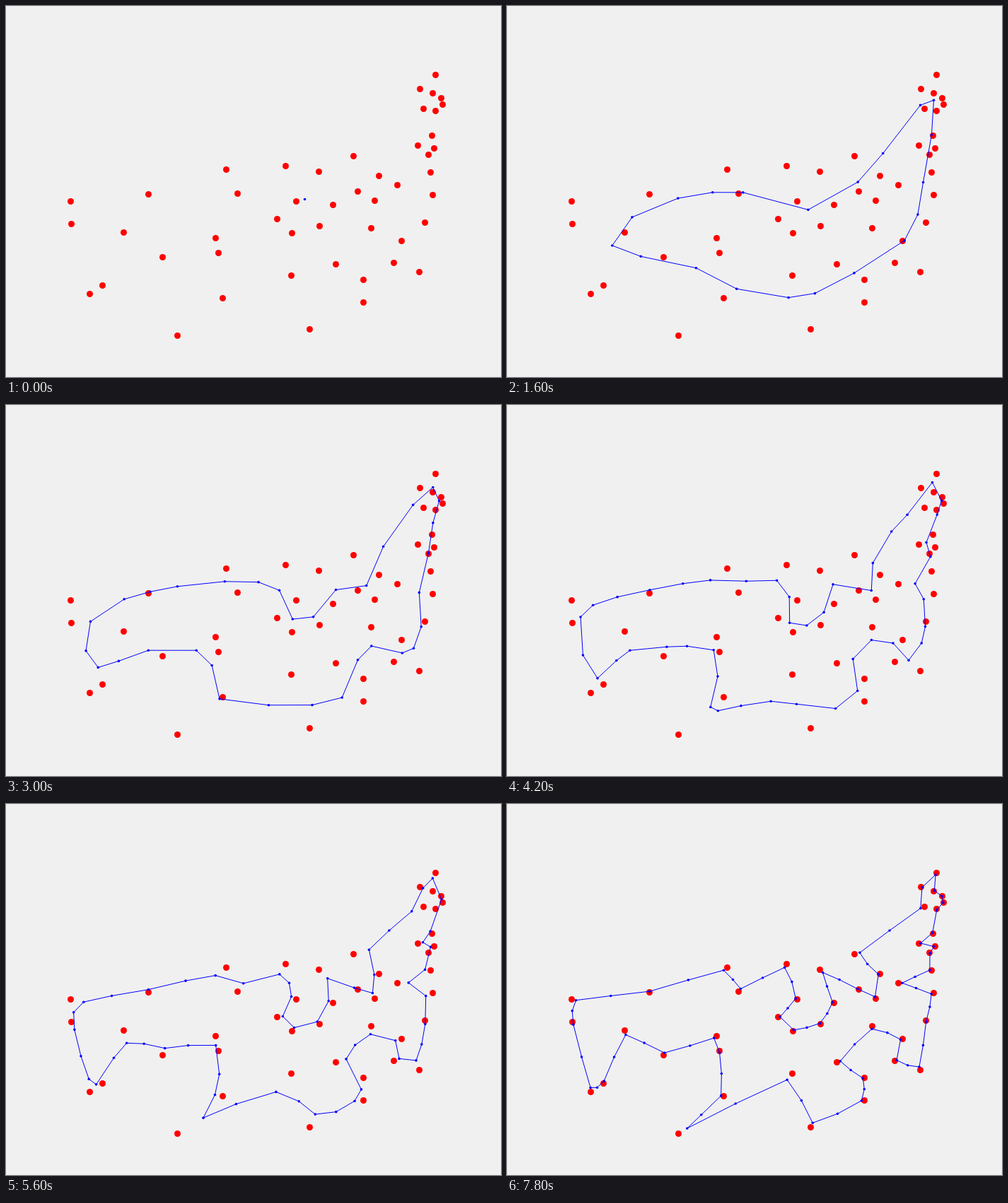
Write an HTML page with a canvas that moves like this. It is 700 by 525 pixels and loops after 8000 ms.

```html
<!DOCTYPE html>
<html lang="en">
<head>
<meta charset="utf-8">
<title>Elastic ring</title>
<style>
html, body { margin: 0; width: 100%; height: 100%; overflow: hidden; background: #f0f0f0; }
canvas { display: block; }
</style>
</head>
<body>
<canvas id="stage" width="700" height="525"></canvas>
<script>
const ctx = document.getElementById('stage').getContext('2d');
const LOOP = 8000, STEP = 200, SEED = [422, 273];

// The cities in the order in which the ring visits them.
const cities = [
  [118, 407], [92, 308], [91, 276], [201, 266], [311, 231], [327, 265], [395, 226], [410, 276],
  [383, 301], [404, 321], [443, 311], [462, 281], [442, 234], [497, 262], [521, 275], [527, 240],
  [491, 212], [590, 145], [585, 117], [607, 97], [603, 123], [615, 130], [617, 139], [607, 148],
  [602, 183], [582, 197], [605, 201], [597, 210], [600, 235], [553, 253], [603, 267], [592, 306],
  [584, 376], [548, 363], [559, 332], [516, 314], [466, 365], [505, 387], [505, 419], [429, 457],
  [403, 381], [242, 466], [306, 413], [300, 349], [296, 328], [221, 355], [166, 320], [136, 395]
];

const dist = (a, b) => Math.hypot(a[0] - b[0], a[1] - b[1]);

// Mean of the cities, weighted by a bell curve around place u of the tour.
function pull(u, sigma) {
  let x = 0, y = 0, sum = 0;
  cities.forEach((c, k) => {
    const gap = Math.abs(u - k);
    const d = Math.min(gap, cities.length - gap);
    const w = Math.exp(-0.5 * (d / sigma) ** 2);
    x += w * c[0];
    y += w * c[1];
    sum += w;
  });
  return [x / sum, y / sum];
}

// Drops the nodes that matter least to the shape until count are left.
function thin(ring, count) {
  while (ring.length > count) {
    const n = ring.length;
    const worth = ring.map((p, i) => {
      const a = ring[(i + n - 1) % n], b = ring[(i + 1) % n];
      return dist(a, p) + dist(p, b) - 0.9 * dist(a, b);
    });
    ring.splice(worth.indexOf(Math.min(...worth)), 1);
  }
  return ring;
}

// The reach of each node shrinks with time while new nodes join the ring.
function ringAt(t) {
  if (t === 0) return [SEED];
  const sigma = 3.3 / t;
  const grow = 1 - Math.exp(-5 * t);
  const ring = Array.from({ length: 2 * cities.length }, (_, i) =>
    pull(i / 2, sigma).map((v, axis) => SEED[axis] + (v - SEED[axis]) * grow));
  return thin(ring, Math.round(4 + 9.7 * t));
}

function dot([x, y], r) {
  ctx.beginPath();
  ctx.arc(x, y, r, 0, 2 * Math.PI);
  ctx.fill();
}

function paint(t) {
  const ring = ringAt(t);
  ctx.setTransform(1, 0, 0, 1, 0, 0);
  ctx.fillStyle = '#f0f0f0';
  ctx.fillRect(0, 0, 700, 525);
  ctx.translate(0.5, 0.5);
  ctx.fillStyle = '#f00';
  cities.forEach(c => dot(c, 4.5));
  ctx.fillStyle = ctx.strokeStyle = '#00f';
  ctx.beginPath();
  ring.forEach(p => ctx.lineTo(...p));
  ctx.closePath();
  if (ring.length > 1) ctx.stroke();
  ring.forEach(p => dot(p, 1.8));
}

let shown = -1;
function frame() {
  const step = Math.floor(performance.now() % LOOP / STEP);
  if (step !== shown) paint(step * STEP / 1000);
  shown = step;
  requestAnimationFrame(frame);
}
frame();
</script>
</body>
</html>
```
